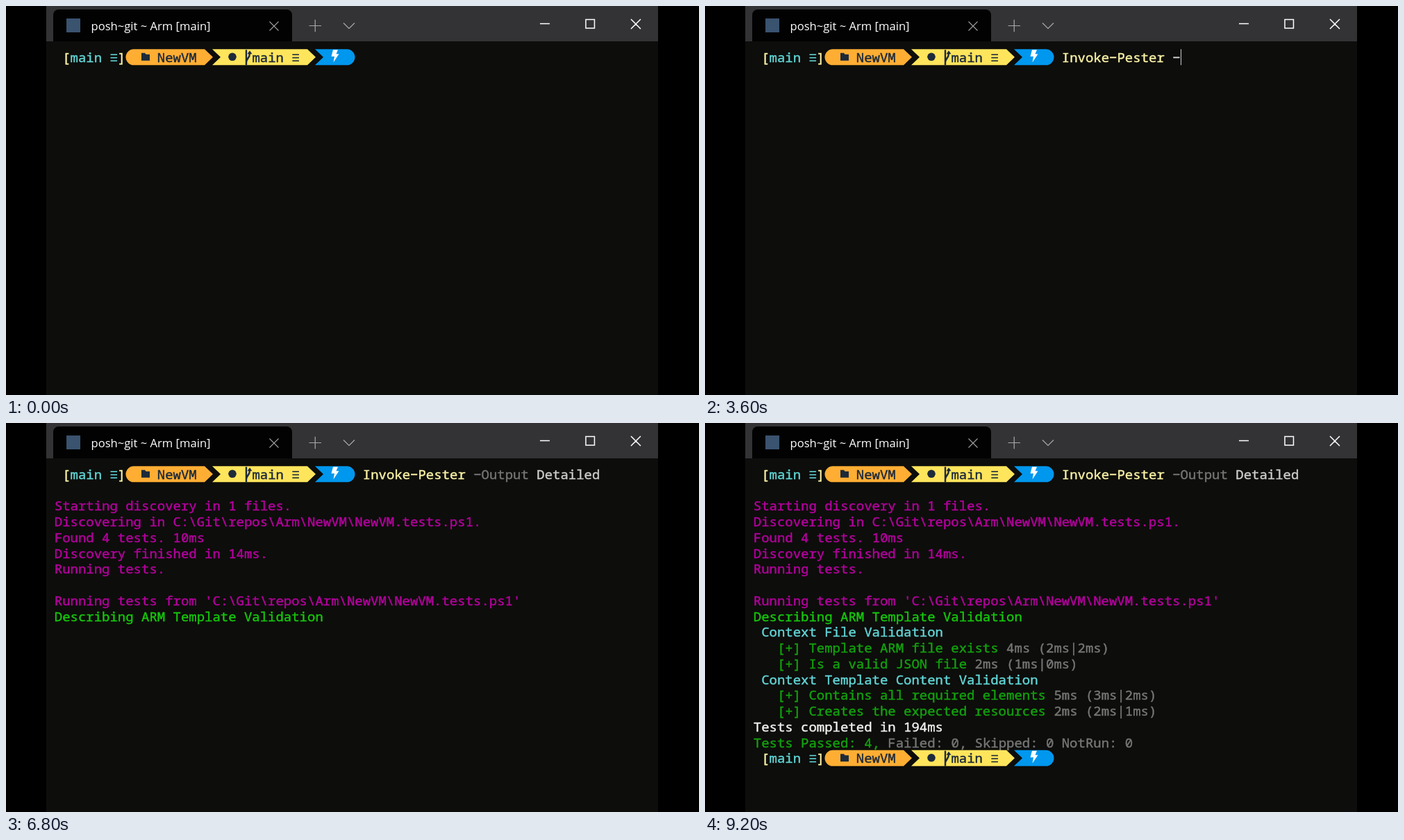
An HTML page with a canvas that plays this animation: 998x561 px, repeating every 10 s.

```html
<!DOCTYPE html>
<html lang="en">
<head>
<meta charset="utf-8">
<title>Terminal test run</title>
<style>
  html, body { margin: 0; width: 100%; height: 100%; overflow: hidden; background: #000; }
  canvas { display: block; }
</style>
</head>
<body>
<canvas id="stage" width="998" height="561"></canvas>
<script>
const ctx = document.getElementById('stage').getContext('2d');
const LOOP = 10000, CELL = 11.385, LINE = 22.75, LEFT = 69.8, TOP = 62.3;
const YELLOW = '#f9f1a5', CYAN = '#61d6d6', PURPLE = '#b4009e', LIME = '#16c60c',
      GREEN = '#13a10e', GREY = '#767676', LIGHT = '#cccccc', WHITE = '#f2f2f2', NAVY = '#1d2a3a';

// [start ms, command, parameter, argument, cursor visible]
const typing = [
  [0, '', '', '', false],
  [200, '', '', '', true],
  [400, 'i', '', '', false],
  [600, 'in', '', '', false],
  [800, 'inv', '', '', false],
  [1000, 'invo', '', '', false],
  [1200, 'invok', '', '', true],
  [1400, 'invoke', '', '', false],
  [1600, 'invoke-', '', '', false],
  [1800, 'invoke-p', '', '', false],
  [2000, 'invoke-pe', '', '', false],
  [2200, 'invoke-pes', '', '', false],
  [2400, 'Invoke-Pester', '', '', true],
  [2800, 'Invoke-Pester', '', '', false],
  [3000, 'Invoke-Pester ', '', '', true],
  [3400, 'Invoke-Pester ', '', '', false],
  [3600, 'Invoke-Pester ', '-', '', true],
  [4000, 'Invoke-Pester ', '-O', '', false],
  [4200, 'Invoke-Pester ', '-Out', '', false],
  [4400, 'Invoke-Pester ', '-Output ', '', false],
  [4800, 'Invoke-Pester ', '-Output ', '', true],
  [5400, 'Invoke-Pester ', '-Output ', 'D', false],
  [5600, 'Invoke-Pester ', '-Output ', 'Deta', false],
  [5800, 'Invoke-Pester ', '-Output ', 'Detailed', true],
  [6400, 'Invoke-Pester ', '-Output ', 'Detailed', false],
];

const passed = (name, time) => [GREEN, `   [+] ${name} `, GREY, time];
const output = [
  [],
  [PURPLE, 'Starting discovery in 1 files.'],
  [PURPLE, 'Discovering in C:\\Git\\repos\\Arm\\NewVM\\NewVM.tests.ps1.'],
  [PURPLE, 'Found 4 tests. 10ms'],
  [PURPLE, 'Discovery finished in 14ms.'],
  [PURPLE, 'Running tests.'],
  [],
  [PURPLE, "Running tests from 'C:\\Git\\repos\\Arm\\NewVM\\NewVM.tests.ps1'"],
  [LIME, 'Describing ARM Template Validation'],
  [CYAN, ' Context File Validation'],
  passed('Template ARM file exists', '4ms (2ms|2ms)'),
  passed('Is a valid JSON file', '2ms (1ms|0ms)'),
  [CYAN, ' Context Template Content Validation'],
  passed('Contains all required elements', '5ms (3ms|2ms)'),
  passed('Creates the expected resources', '2ms (2ms|1ms)'),
  [WHITE, 'Tests completed in 194ms'],
  [GREEN, 'Tests Passed: 4, ', GREY, 'Failed: 0, Skipped: 0 NotRun: 0'],
];

const colX = col => LEFT + col * CELL;
const rowY = row => TOP + row * LINE;

function rect(color, x, y, w, h, radius = 0) {
  ctx.fillStyle = color;
  ctx.beginPath();
  ctx.roundRect(x, y, w, h, radius);
  ctx.fill();
}

function stroke(color, width, path) {
  ctx.strokeStyle = color;
  ctx.lineWidth = width;
  ctx.stroke(new Path2D(path));
}

function shape(color, path) {
  ctx.fillStyle = color;
  ctx.fill(new Path2D(path));
}

// Writes colour/text pairs one after another on the character grid.
function write(row, col, parts) {
  ctx.font = `${CELL / 0.6}px "Noto Sans Mono", monospace`;
  ctx.lineWidth = 0.45;
  for (let i = 0; i < parts.length; i += 2) {
    const [color, text] = parts.slice(i, i + 2);
    const glyphs = text.replaceAll('-', '\u2212'); // the terminal font has a wide hyphen
    ctx.fillStyle = ctx.strokeStyle = color;
    ctx.fillText(glyphs, colX(col), rowY(row) + 18.5);
    ctx.strokeText(glyphs, colX(col), rowY(row) + 18.5);
    col += text.length;
  }
}

function tripleBar(color, x) {
  for (const y of [7, 11.5, 16]) rect(color, x + 1, y, 9.6, 1.6);
}

function prompt(row) {
  write(row, 1, [YELLOW, '[', CYAN, 'main', YELLOW, '  ]']);
  ctx.save();
  ctx.translate(0, rowY(row));
  tripleBar(CYAN, colX(7));
  shape('#ffae33', 'M184 0H286L298 11.5L286 23H184A11.5 11.5 0 0 1 184 0Z');
  shape('#ffe55c', 'M297 0H434L446 11.5L434 23H297L309 11.5Z');
  shape('#0097ee', 'M445 0H491A11.5 11.5 0 0 1 491 23H445L457 11.5Z');
  shape(NAVY, 'M195 5.5h5l1.5 2h5.5v9h-12z');
  ctx.beginPath();
  ctx.arc(326, 11, 5.8, 0, 7);
  ctx.fill();
  stroke(NAVY, 2.4, 'M346 1V23M346 19C346 13 351 14 351 6');
  shape(NAVY, 'M347.5 7L351 2L354.5 7Z');
  tripleBar(NAVY, colX(30));
  shape('#fff', 'M471 1h7l-2.5 6h4l-8 12l1.5 -8.5h-4.5z');
  ctx.restore();
  write(row, 13, [NAVY, 'NewVM']);
  write(row, 25, [NAVY, 'main']);
}

function cursor(row, col) {
  rect(LIGHT, Math.round(colX(col) + 0.2), rowY(row), 1, 23);
}

function windowFrame() {
  rect('#000', 0, 0, 998, 561);
  rect('#0d0d0b', 58, 51, 881, 510);
  rect('#333335', 58, 0, 881, 51);
  rect('#020202', 68, 5, 344, 46, [8, 8, 0, 0]);
  rect('#3a536f', 87, 18, 20, 20);
  ctx.font = '16.6px "Open Sans", sans-serif';
  ctx.fillStyle = '#fff';
  ctx.fillText('posh~git ~ Arm [main]', 122.5, 35);
  stroke('#a0a0a0', 1.1, 'M379.5 22.5l13 13m0 -13l-13 13');
  stroke('#a8a8a8', 1.2, 'M436.5 28.5h17.5m-8.75 -8.75v17.5M486 24.5l8 8l8 -8');
  stroke('#fff', 1.5, 'M769 25.5h14M835 19.5h12.5v12.5h-12.5zM900 19l14 14m0 -14l-14 14');
}

function draw(now) {
  const t = now % LOOP;
  const [, command, parameter, argument, blink] = typing.findLast(step => step[0] <= t);
  windowFrame();
  prompt(0);
  write(0, 39, [YELLOW, command, parameter === '-' ? LIGHT : GREY, parameter, LIGHT, argument]);
  if (blink) cursor(0, 39 + (command + parameter + argument).length);

  const lines = t < 6800 ? 0 : t < 7000 ? 9 : t < 7200 ? 12 : output.length;
  output.slice(0, lines).forEach((parts, i) => write(i + 1, 0, parts));
  if (lines === output.length) {
    prompt(18);
    if ((t >= 7600 && t < 8200) || (t >= 8800 && t < 9200)) cursor(18, 39);
  }
}

const start = performance.now();
function tick() {
  draw(performance.now() - start);
  requestAnimationFrame(tick);
}
tick();
</script>
</body>
</html>
```
